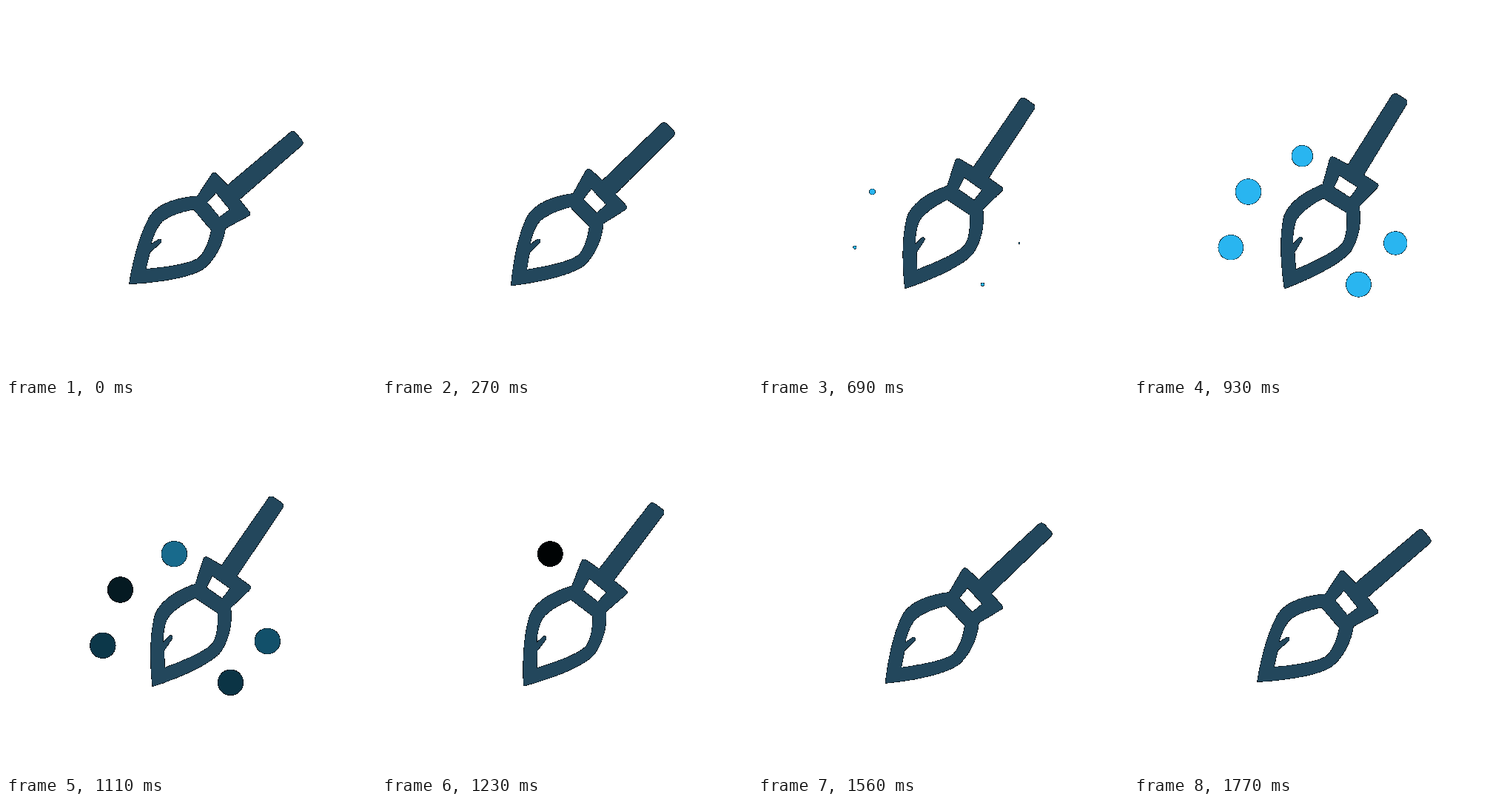
These frames come from a looping animation (500 by 500 pixels, 1830 ms). An HTML page with a canvas:

```html
<!DOCTYPE html>
<html lang="en">
<head>
<meta charset="utf-8">
<title>Sweeping broom</title>
<style>
html, body { margin: 0; width: 100%; height: 100%; overflow: hidden; background: #fff; }
canvas { display: block; }
</style>
</head>
<body>
<canvas id="stage" width="500" height="500"></canvas>
<script>
const ctx = document.getElementById('stage').getContext('2d', { willReadFrequently: true });
const STEP = 30, LOOP = 1830;
const PIVOT = [205.5, 260.5], ANCHOR = [206.6, 260.4];
const SCALE = 0.995, SWING = 17.8, HALF = 29.75;
const NAVY = '#23475c', SKY = '#29b5f0';
const GROW = 11.5, FADE = 7, RADIUS = 17.2;

// x, y, step at which the dot starts to grow
const dots = [
  [154.5, 251, 19.5],
  [130.8, 326.3, 20.6],
  [303.5, 376.3, 20.5],
  [353.3, 320.5, 21.6],
  [227.3, 202.7, 22.6]
];

const broom = new Path2D(`
  M260 257 L279.5 227 Q282.5 223 286.5 227 L301 242
  L386 170.5 Q389 167.5 393 170.5 L402 181 Q404.5 184.5 402 187.5
  L317 261.5 L330.5 278 Q333 281.5 329.5 283.5 L298 300.5
  C295 322 284 342 270 354 C255 366 210 374 167.5 376
  C172.5 344 181.5 311 192.5 290 C202 268 231 259 260 257 Z
  M285.2 252 L273.2 265.5 L290 285.5 L304 275 Z
  M255 275 C236 278 215 286 209 295 C203 303 199 314 197 322
  L208 315.5 Q212.5 315.5 210.5 320 L195.5 333
  L190 356 C220 353 250 349 262 340.5 C271 332 276 317 279 303 Z`);

const clamp = v => Math.min(1, Math.max(0, v));
const ease = v => v * v * (3 - 2 * v);

function drawBroom(step) {
  const swing = ease(clamp(1 - Math.abs(step - HALF) / HALF)) * SWING;
  ctx.save();
  ctx.translate(...PIVOT);
  ctx.rotate(-swing * Math.PI / 180);
  ctx.scale(SCALE, SCALE);
  ctx.translate(-ANCHOR[0], -ANCHOR[1]);
  ctx.fillStyle = NAVY;
  ctx.fill(broom, 'evenodd');
  ctx.restore();
}

function drawDot(step, [x, y, start]) {
  const r = RADIUS * ease(clamp((step - start) / GROW));
  const alpha = 1 - clamp((step - start - GROW) / FADE);
  if (r <= 0 || alpha <= 0) return;
  ctx.globalAlpha = alpha;
  ctx.fillStyle = SKY;
  ctx.beginPath();
  ctx.arc(x, y, r, 0, Math.PI * 2);
  ctx.fill();
  ctx.globalAlpha = 1;
}

// Translucent pixels become solid and blend toward black.
function darkenEdges() {
  const img = ctx.getImageData(0, 0, 500, 500), d = img.data;
  for (let i = 0; i < d.length; i += 4) {
    const a = d[i + 3];
    if (!a || a === 255) continue;
    for (let c = 0; c < 3; c++) d[i + c] = d[i + c] * a / 255;
    d[i + 3] = 255;
  }
  ctx.putImageData(img, 0, 0);
}

function draw(step) {
  ctx.clearRect(0, 0, 500, 500);
  drawBroom(step);
  dots.forEach(dot => drawDot(step, dot));
  darkenEdges();
}

const begin = performance.now();
let last = -1;
function tick() {
  const time = (performance.now() - begin) % LOOP;
  const step = Math.min(59, Math.floor(time / STEP));
  if (step !== last) draw(last = step);
  requestAnimationFrame(tick);
}
tick();
</script>
</body>
</html>
```
